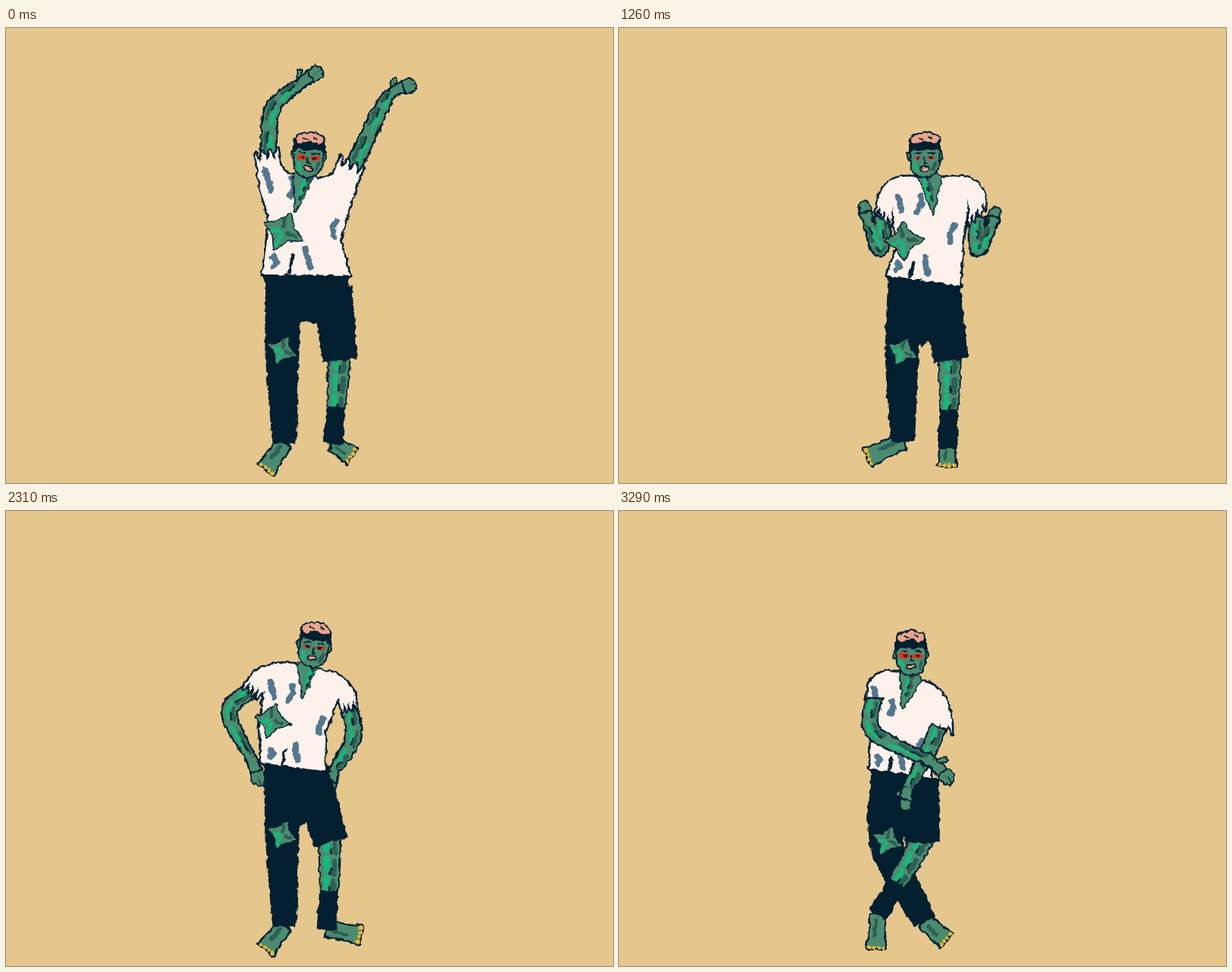
These frames come from a looping animation (800x600 px, 3.36 s). An HTML page:

```html
<!DOCTYPE html>
<html lang="en">
<head>
<meta charset="utf-8">
<title>Dancing zombie</title>
<style>
html, body { margin: 0; width: 100%; height: 100%; overflow: hidden; background: #e5c78e; }
svg { display: block; width: 800px; height: 600px; }
path, ellipse { stroke-linejoin: round; stroke-linecap: round; }
</style>
</head>
<body>
<svg viewBox="0 0 800 600">
  <filter id="rough" filterUnits="userSpaceOnUse" x="0" y="0" width="800" height="600" color-interpolation-filters="sRGB">
    <feTurbulence type="fractalNoise" baseFrequency=".12" numOctaves="2" seed="4"/>
    <feDisplacementMap in="SourceGraphic" scale="6" xChannelSelector="R" yChannelSelector="G"/>
  </filter>
  <g id="body" filter="url(#rough)"></g>
</svg>
<script>
const INK = '#031f30', SKIN = '#4c8b70', BRIGHT = '#18b77c', DARK = '#2c6054',
  CREAM = '#fdf1eb', BLUE = '#55778d', GOLD = '#f2b833', PEACH = '#e9a48c', RED = '#f02a12';
const STEP = 70, LOOP = 48;

// Joints. arm: root, elbow, wrist, fingertip. leg: hip, knee, ankle, toe.
// shirt: collar, shoulder, two sleeve ends, armpit, waist, hem.
// mid: collar tip, crotch, belly tear and its spike. head: centre, then turn and eye size.
const reach = pose({
  armL: '346,174 351,108 386,74 415,55', armR: '459,182 489,116 507,85 538,73',
  shirtL: '379,193 363,198 357,158 329,165 333,200 347,256 338,325',
  shirtR: '405,196 434,206 441,168 471,183 455,228 440,280 453,326',
  legL: '366,340 364,430 367,547 343,582', legR: '430,342 440,438 431,548 456,564',
  mid: '381,243 388,387 365,268 391,280', head: '399,168 4,6'
});
const wave = pose({
  armL: '331,180 306,134 276,98 228,91', armR: '452,185 445,128 405,84 373,74',
  shirtL: '394,204 365,196 336,166 322,181 330,205 362,258 374,345',
  shirtR: '420,206 432,190 443,165 464,188 463,212 459,262 469,318',
  legL: '397,340 362,430 362,547 320,569', legR: '444,330 440,436 428,556 460,574',
  mid: '411,246 422,372 380,270 411,267', head: '407,175 6,7'
});
const fists = pose({
  armL: '348,250 344,292 328,256 322,231', armR: '472,250 473,292 491,262 497,238',
  shirtL: '395,197 340,188 339,245 358,262 360,235 366,290 353,326',
  shirtR: '425,197 488,188 483,240 461,262 461,225 453,285 449,340',
  legL: '378,338 373,432 374,545 328,566', legR: '424,342 437,438 433,553 432,577',
  mid: '414,245 400,420 375,280 402,279', head: '403,168 0,4'
});
const hips = pose({
  armL: '321,238 294,266 323,326 335,360', armR: '453,262 457,300 431,344 426,368',
  shirtL: '385,202 325,194 313,236 330,247 341,236 334,285 337,332',
  shirtR: '407,209 462,212 462,262 443,266 438,246 420,292 421,343',
  legL: '364,340 364,432 367,547 343,578', legR: '400,345 428,436 423,551 467,559',
  mid: '391,247 388,415 350,276 374,282', head: '406,177 8,4'
});
const crossed = pose({
  armL: '336,248 336,292 412,330 438,357', armR: '421,286 403,326 380,366 377,394',
  shirtL: '371,213 328,203 326,250 348,265 330,242 332,300 331,340',
  shirtR: '398,224 440,232 439,295 404,295 412,290 410,325 411,352',
  legL: '356,350 353,440 403,541 431,566', legR: '396,355 400,436 341,532 339,577',
  mid: '374,260 376,430 365,300 368,301', head: '385,188 0,7'
});

function pose(parts) {
  const points = s => s.split(' ').map(p => p.split(',').map(Number));
  return Object.fromEntries(Object.entries(parts).map(([k, v]) => [k, points(v)]));
}
const clamp = v => Math.max(0, Math.min(1, v));
const lerp = (a, b, t) => a.map((v, i) => v + (b[i] - v) * t);
const dist = (a, b) => Math.hypot(b[0] - a[0], b[1] - a[1]);
const polar = ([x, y], r, a) => [x + r * Math.cos(a), y + r * Math.sin(a)];
const range = n => [...Array(n).keys()];
const mix = (a, b, t) =>
  Object.fromEntries(Object.keys(a).map(k => [k, a[k].map((p, i) => lerp(p, b[k][i], t))]));

function warp(p, fn, keys = Object.keys(p)) {
  const out = { ...p };
  for (const k of keys) out[k] = p[k].map((q, i) => k === 'head' && i ? q : fn(q));
  return out;
}
const lean = (p, dx, dy) => warp(p, ([x, y]) => {
  const c = clamp((520 - y) / 200);
  return [x + dx * c, y + dy * c];
});

// Hip sway to the other side: arms and shirt swap places, the rest leans along.
function swayed(p) {
  const flip = k => p[k].map(([x, y]) => [778 - x, y]);
  return {
    ...lean(p, 17, 0), mid: p.mid, head: [flip('head')[0], [-p.head[1][0], p.head[1][1]]],
    armL: flip('armR'), armR: flip('armL'), shirtL: flip('shirtR'), shirtR: flip('shirtL')
  };
}
const hipsOther = swayed(hips);
const ARMS = ['armL', 'armR'];

function dance(k) {
  const p = k % 6;
  if (k < 12) {
    const t = p / 5, lift = 45 * Math.sin(Math.PI * t);
    return warp(mix(reach, wave, t), ([x, y]) => [x, y - lift * clamp((170 - y) / 90)], ARMS);
  }
  if (k < 24) {
    const s = Math.sin(Math.PI * Math.min(p, 4) / 5);
    const out = warp(fists, ([x, y]) => [x + Math.sign(x - 411) * 23 * s * clamp((Math.abs(x - 411) - 50) / 40), y], ARMS);
    return lean(out, 3 * s, -3 * s);
  }
  if (k < 36) {
    const a = (k - 26) / 7 * 2 * Math.PI;
    return lean(mix(hips, hipsOther, (1 - Math.cos(a)) / 2), 0, -5 * Math.sin(a));
  }
  const u = .65 * Math.sin(Math.PI * ((p + 1) % 6) / 6);
  return lean(mix(crossed, hips, u), 0, -12 * u);
}

const path = (pts, end = 'z') => 'M' + pts.map(q => q.map(v => v.toFixed(1))).join(' ') + end;
const fill = (d, color) => `<path d="${d}" fill="${color}"/>`;
const line = (d, color, w) => `<path d="${d}" fill="none" stroke="${color}" stroke-width="${w}"/>`;
const inked = (d, color, w = 5) => line(d, INK, w) + fill(d, color);

// Smooth curve through points.
function curve(p, u) {
  const x = u * (p.length - 1), i = Math.min(Math.floor(x), p.length - 2), t = x - i;
  const at = j => p[Math.max(0, Math.min(p.length - 1, j))];
  return at(i).map((b, n) => {
    const a = at(i - 1)[n], c = at(i + 1)[n], e = at(i + 2)[n];
    return b + t / 2 * (c - a + t * (2 * a - 5 * b + 4 * c - e + t * (3 * (b - c) + e - a)));
  });
}
// Point beside the curve; side runs from -1 to 1 across the given widths.
function beside(p, widths, u, side) {
  const a = curve(p, Math.max(0, u - .02)), b = curve(p, Math.min(1, u + .02));
  const x = u * (widths.length - 1), i = Math.min(Math.floor(x), widths.length - 2);
  const w = widths[i] + (widths[i + 1] - widths[i]) * (x - i);
  return polar(curve(p, u), side * w / 2, Math.atan2(b[1] - a[1], b[0] - a[0]) + Math.PI / 2);
}
function ribbon(p, widths) {
  const edge = side => range(21).map(i => beside(p, widths, i / 20, side));
  return path([...edge(-1), ...edge(1).reverse()]);
}
function streaks(p, widths) {
  const w = widths[0] / 4;
  const dashes = (side, from, len, gap) => range(3).map(i => {
    const u = from + i * gap;
    return path([0, .5, 1].map(f => beside(p, widths, u + f * len, side)), '');
  }).join('');
  return line(dashes(-.5, .08, .2, .32), DARK, w) + line(dashes(.3, .04, .2, .31), BRIGHT, w) +
    line(dashes(-.1, .2, .09, .3), INK, 2.5);
}

function arm([root, elbow, wrist, tip]) {
  const bones = [root, elbow, wrist], widths = [19, 18, 11];
  const len = dist(wrist, tip), dir = Math.atan2(tip[1] - wrist[1], tip[0] - wrist[0]);
  const palm = lerp(wrist, tip, .5), up = Math.cos(dir) > 0 ? -1 : 1;
  const fingers = range(4).map(i => {
    const f = i - 1.5;
    return path([polar(palm, f * 3.5, dir + Math.PI / 2), polar(palm, len * (.5 - Math.abs(f) * .06), dir + f * .3)], '');
  }).join('') + path([wrist, polar(wrist, len * .5, dir + up * .9)], '');
  return line(fingers, INK, 8) + line(fingers, SKIN, 4) +
    inked(ribbon(bones, widths) + ribbon([wrist, palm], [11, 13]), SKIN) + streaks(bones, widths);
}

function foot([, , ankle, toe]) {
  const p = [ankle, toe], widths = [20, 19, 25];
  const nails = range(4).map(i => path([beside(p, widths, .96, i / 2 - .75)], 'h0')).join('');
  return inked(ribbon(p, widths), SKIN) +
    line(path([beside(p, widths, .25, .2), beside(p, widths, .6, .3)], ''), DARK, 5) + line(nails, GOLD, 5);
}

// Ragged hole with four long spikes.
function tear(centre, r, turn) {
  const d = path(range(8).map(i => polar(centre, r * (i % 2 ? .5 : 1 - i * .02), turn + i * Math.PI / 4)));
  const dash = (a, len) => path([polar(centre, r * .2, turn + a), polar(centre, r * len, turn + a)], '');
  return inked(d, SKIN, 3) + line(dash(1.6, .7) + dash(2.8, .5), BRIGHT, r / 5) +
    line(dash(0, .6) + dash(4.5, .6), DARK, r / 5);
}

function legs({ legL, legR, shirtL, shirtR, mid }) {
  const [hip, knee, ankle] = legR, torn = lerp(knee, ankle, .62);
  const calf = [lerp(knee, hip, .05), lerp(knee, ankle, .3), torn], widths = [27, 25, 20];
  return foot(legL) + foot(legR) +
    inked(ribbon(legL.slice(0, 3), [46, 43, 29]), INK, 2) +
    inked(ribbon(calf, widths), SKIN, 4) + streaks(calf, widths) +
    inked(ribbon([lerp(torn, knee, .08), ankle], [22, 25]), INK, 2) +
    inked(ribbon([hip, knee], [50, 48, 43]), INK, 2) +
    inked(path([shirtL[6], shirtR[6], lerp(hip, knee, .5), mid[1], lerp(legL[0], legL[1], .5)]), INK, 2) +
    tear(lerp(legL[1], legL[0], .06), 21, .4);
}

// One half of the shirt with a round shoulder and a torn sleeve.
function half([collar, shoulder, a, b, pit, waist, hem]) {
  const round = range(8).map(i => lerp(lerp(collar, shoulder, i / 8), lerp(shoulder, a, i / 8), i / 8));
  const from = lerp(a, b, .5), to = lerp(shoulder, pit, .5), cut = 14 / Math.max(14, dist(from, to));
  const teeth = range(7).map(i => {
    const p = lerp(a, b, i / 6);
    return i % 2 ? lerp(p, [p[0] + to[0] - from[0], p[1] + to[1] - from[1]], cut) : p;
  });
  return [...round, ...teeth, pit, waist, hem];
}
function shirt({ shirtL: l, shirtR: r, mid }) {
  const cloth = (u, v) => lerp(lerp(l[4], r[4], u), lerp(l[6], r[6], u), v);
  const stains = [[.1, -.02], [.36, 0], [.82, .4], [.52, .8], [.14, .86]].map(([u, v], i) =>
    path([-1, 0, 1].map(f => cloth(u + .03 * Math.sin(i * 2 + f * 2), v + f * (i < 4 ? .1 : .05))), '')).join('');
  return inked(path([mid[0], ...half(r), ...half(l).reverse()]), CREAM) +
    line(stains, BLUE, 8) + line(path([cloth(.35, .78), cloth(.31, .98)], ''), INK, 4);
}

function neck({ shirtL, shirtR, mid, head }) {
  const [x, y] = head[0], tip = mid[0], p = [[x, y + 24], lerp([x, y + 24], tip, .7)];
  return inked(path([shirtL[0], [x - 10, y + 18], [x + 10, y + 18], shirtR[0], lerp(shirtR[0], tip, .5), tip]), SKIN, 3) +
    streaks(p, [18, 8]);
}

function face([[x, y], [turn, eye]]) {
  const oval = (cx, cy, rx, ry, color, w = 2) =>
    `<ellipse cx="${cx}" cy="${cy}" rx="${rx}" ry="${ry}" fill="${color}" stroke="${INK}" stroke-width="${w}"/>`;
  const both = draw => draw(-1) + draw(1);
  const lobes = w => range(5).map(i => oval(i * 6 - 12, -21 - 3 * Math.sin(i * Math.PI / 4), 6, 6, PEACH, w)).join('');
  return `<g transform="translate(${x} ${y}) rotate(${turn})">` +
    both(s => oval(s * 20, 1, 3, 6, SKIN)) +
    inked('M-19,-14L-18,12Q-15,28 0,28Q15,28 18,12L19,-14z', SKIN, 4) +
    both(s => line(`M${s * 14},10l${-s * 3},9`, s < 0 ? BRIGHT : DARK, 4)) +
    inked('M-20,-3L-20,-20Q0,-32 20,-20L20,-3L16,-9Q0,-6 -16,-9z', INK, 2) +
    lobes(4) + lobes(0) + line('M-8,-23l4,2M5,-25l4,3M-1,-18h4', INK, 2) +
    both(s => line(`M${s * 9 - 3},3h6`, RED, eye) + line(`M${s * 8},3h0`, INK, 4) + line(`M${s * 9 - 4},-3h8`, INK, 2)) +
    line('M0,3l-1,7h4', INK, 2) + oval(0, 17, 6, 3, PEACH) + '</g>';
}

function draw(k) {
  const p = dance(k), front = k >= 36, arms = arm(p.armR) + arm(p.armL);
  const [, , hole, spike] = p.mid;
  document.getElementById('body').innerHTML = (front ? '' : arms) + legs(p) + shirt(p) +
    tear(hole, dist(hole, spike), Math.atan2(spike[1] - hole[1], spike[0] - hole[0])) +
    neck(p) + face(p.head) + (front ? arms : '');
}

const start = performance.now();
let shown = -1;
function tick() {
  const k = Math.floor((performance.now() - start) / STEP) % LOOP;
  if (k !== shown) draw(shown = k);
  requestAnimationFrame(tick);
}
tick();
</script>
</body>
</html>
```
